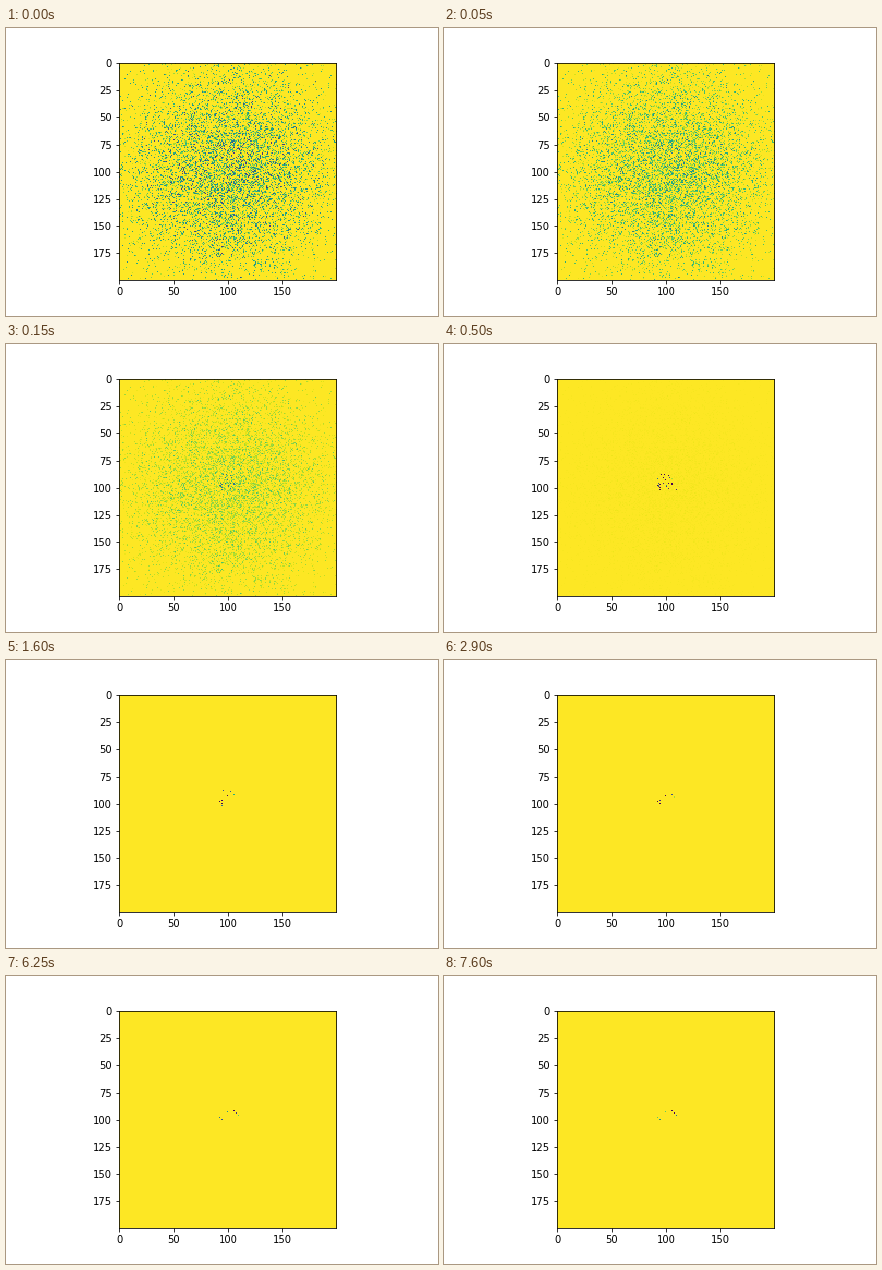
Write a matplotlib script that moves like this. It is 432x288 px and loops after 8 s.

```python
import numpy as np
import matplotlib.pyplot as plt
from matplotlib.animation import FuncAnimation

SIZE = 200
STEP_MS = 50
FRAMES = 160
CLOUD_END = 0.85

# Cells near the middle: those that fade (column, row, seconds to vanish)
# and those that darken late (column, row).
FADING = [(92, 98, 8.4), (94, 97, 6.0), (99, 93, 8.2), (94, 100, 9.5)]
RISING = [(105, 92), (107, 94), (109, 96)]

plt.rcParams.update({"font.family": "DejaVu Sans", "font.size": 10})
rng = np.random.default_rng(11)


def make_cloud(count=9500, spread=50):
    """Normally distributed hits of uneven strength."""
    hits = np.rint(rng.normal(99.5, spread, (count, 2))).astype(int)
    hits = hits[((hits >= 0) & (hits < SIZE)).all(axis=1)]
    cloud = np.zeros((SIZE, SIZE))
    np.add.at(cloud, (hits[:, 1], hits[:, 0]),
              rng.uniform(0.04, 0.55, len(hits)))
    return np.clip(cloud, 0, 0.85)


def make_specks(count=20):
    """Short-lived cells scattered around the middle."""
    cols = np.clip(rng.normal(100, 4.5, count), 92, 109).astype(int)
    rows = np.clip(rng.normal(98, 5, count), 88, 108).astype(int)
    lives = np.clip(0.5 + rng.exponential(0.9, count), 0, 4.5)
    return list(zip(cols, rows, lives))


def ramp(t, start, length):
    return min(max((t - start) / length, 0), 1)


def stepped(level, steps=8):
    return round(level * steps) / steps


CLOUD = make_cloud()
FADING_CELLS = FADING + make_specks()


def field(t):
    fade = 0.7 ** (t / 0.05) if t <= CLOUD_END else 0
    drop = CLOUD * fade
    appear = ramp(t, 0, 0.25)
    for col, row, life in FADING_CELLS:
        level = appear * stepped(1 - ramp(t, 0, life) ** 3)
        drop[row, col] = max(drop[row, col], level)
    for col, row in RISING:
        level = stepped(ramp(t, 1.3 * (col - 105), 4))
        drop[row, col] = max(drop[row, col], level)
    return 1 - drop


fig, ax = plt.subplots(figsize=(6, 4), dpi=72, facecolor="white")
fig.subplots_adjust(left=0.125, right=0.9, bottom=0.125, top=0.88)
image = ax.imshow(field(0), cmap="viridis", vmin=0, vmax=1,
                  interpolation="nearest")
ax.set_xticks(range(0, SIZE, 50))
ax.set_yticks(range(0, SIZE, 25))


def update(i):
    image.set_data(field(i * STEP_MS / 1000))
    return [image]


anim = FuncAnimation(fig, update, frames=FRAMES, interval=STEP_MS,
                     repeat=True, repeat_delay=0)
plt.show()
```
